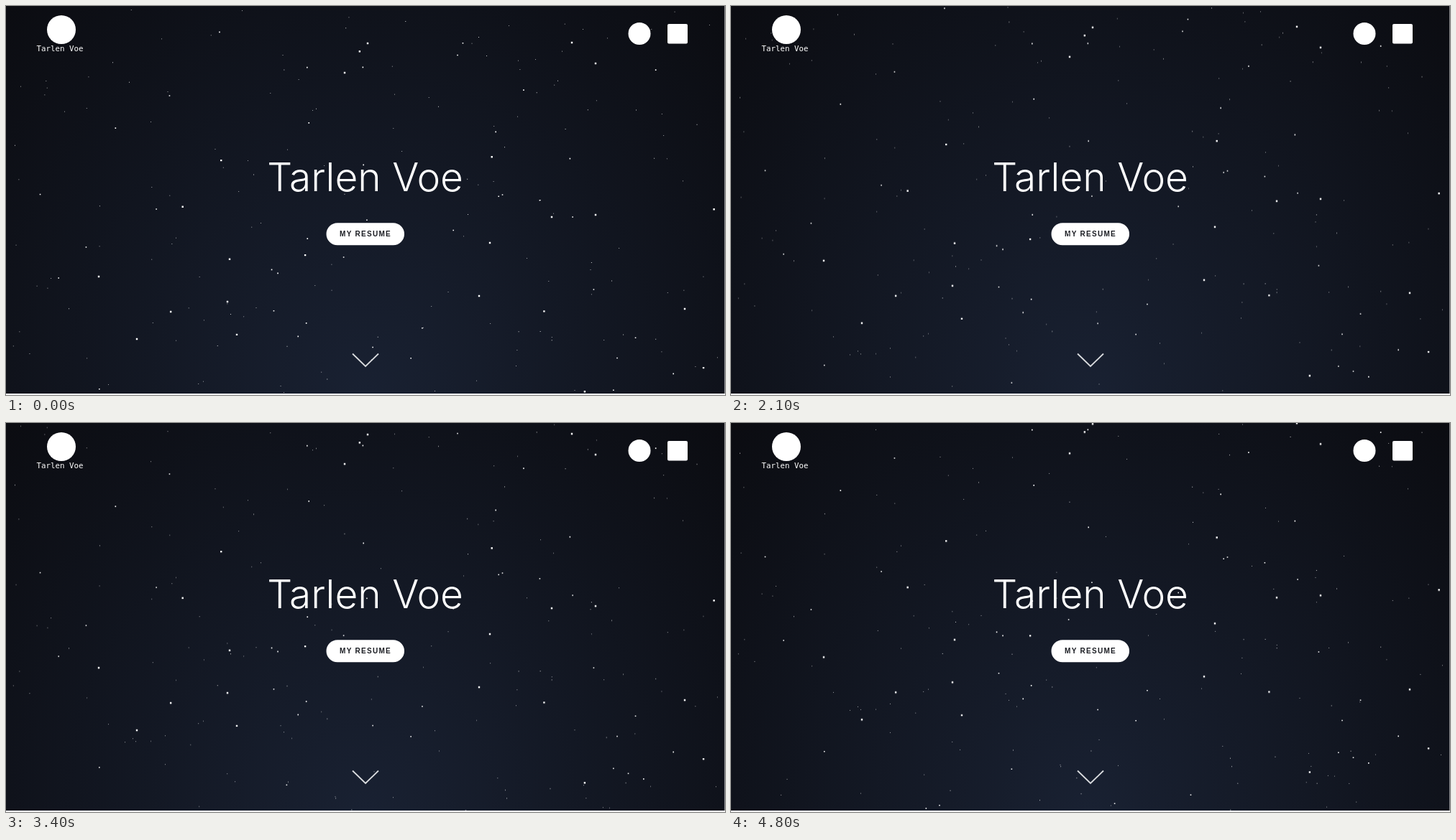
Recreate the animation shown at these times as an HTML page. Size 1000 by 542 pixels, loop 4.9 s.

```html
<!DOCTYPE html>
<html lang="en">
<head>
<meta charset="utf-8">
<title>Night sky landing page</title>
<style>
  html, body { margin: 0; width: 100%; height: 100%; overflow: hidden; background: #fff; }
  svg { display: block; width: 100%; height: 100%; }
  .title { font: 300 55px Inter, "Open Sans", sans-serif; }
  .label { font: 700 10px "Liberation Sans", Arial, sans-serif; letter-spacing: 1.3px; }
  .brand { font: 10.8px "DejaVu Sans Mono", monospace; }
  /* The sky advances ten times per second. */
  .stars { fill: #fff; animation: rise 4.9s steps(49, end) infinite; }
  @keyframes rise { to { transform: translateY(var(--travel)); } }
</style>
</head>
<body>
<svg viewBox="0 0 1000 542" preserveAspectRatio="none">
  <defs>
    <radialGradient id="glow" cx="0.5" cy="1" r="1" gradientTransform="translate(0.5 1) scale(0.7071 1.4142) translate(-0.5 -1)">
      <stop stop-color="#192132"/>
      <stop offset="1" stop-color="#0b0c11"/>
    </radialGradient>
  </defs>
  <rect width="999.5" height="540" fill="url(#glow)"/>

  <g fill="#fff">
    <circle cx="77" cy="33" r="20"/>
    <text class="brand" x="75" y="63" text-anchor="middle">Tarlen Voe</text>
    <circle cx="881" cy="38.5" r="15.5"/>
    <rect x="920" y="25" width="28" height="27.5" rx="2"/>
    <text class="title" x="499.5" y="258" text-anchor="middle">Tarlen Voe</text>
    <rect x="445.5" y="302.3" width="108.5" height="31" rx="15.5"/>
  </g>
  <text class="label" x="464" y="321" fill="#1b1d23">MY RESUME</text>
  <path d="M482 484.5L500 502L518 484.5" fill="none" stroke="#d9dbde" stroke-width="1.8"/>
  <g id="sky"></g>
</svg>
<script>
  const LOOP_SECONDS = 4.9;
  const BASE_SPEED = 31.7;
  const BASE_SIZE = 0.8;

  // The most visible stars; all others are scattered.
  const brightest = [
    [503, 52], [471, 93], [787, 51], [820, 80], [759, 294], [820, 291],
    [673, 330], [658, 404], [308, 412], [182, 464], [129, 377], [944, 422]
  ];

  function seededRandom(seed) {
    return () => (seed = seed * 16807 % 2147483647) / 2147483647;
  }

  const random = seededRandom(4217);

  function scatter(count, height) {
    return Array.from({ length: count }, () => [random() * 998, random() * height]);
  }

  // Larger stars drift more slowly.
  function addLayer(scale, count, fixed = []) {
    const size = BASE_SIZE * scale;
    const travel = BASE_SPEED / scale * LOOP_SECONDS;
    const points = [...fixed, ...scatter(count, 542 + travel)];
    const layer = document.createElementNS("http://www.w3.org/2000/svg", "path");
    layer.setAttribute("class", "stars");
    layer.setAttribute("d", points.map(([x, y]) =>
      `M${x - size / 2} ${y - size / 2}h${size}v${size}h${-size}z`).join(""));
    layer.style.setProperty("--travel", `${-travel}px`);
    document.getElementById("sky").append(layer);
  }

  addLayer(1, 195);
  addLayer(2, 46);
  addLayer(3, 12, brightest);
</script>
</body>
</html>
```
